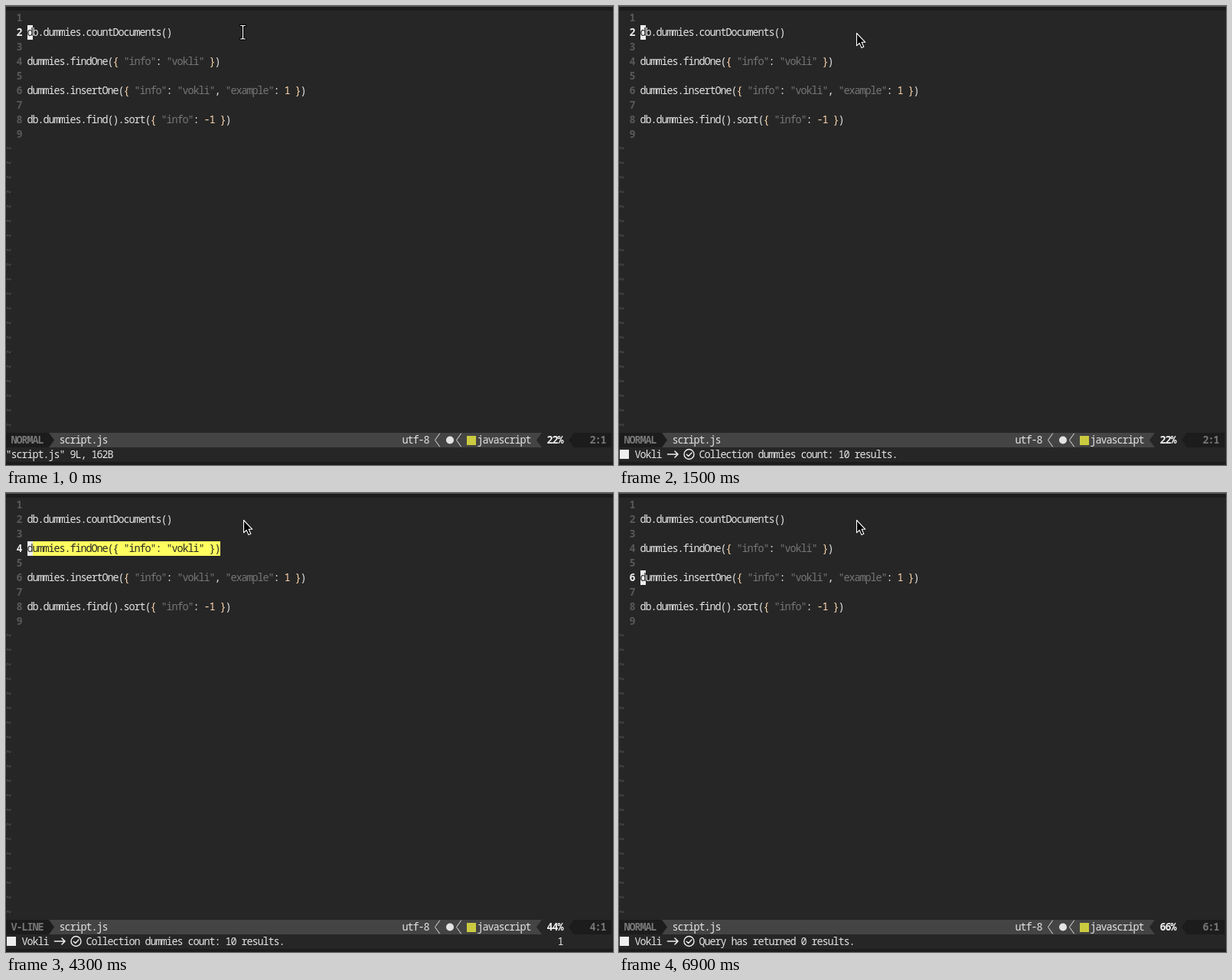
An HTML page that plays this animation: 793 by 599 pixels, repeating every 8 s.

```html
<!DOCTYPE html>
<html lang="en">
<head>
<meta charset="utf-8">
<title>Editor session</title>
<style>
  html, body { margin: 0; width: 100%; height: 100%; overflow: hidden; background: #1c1c1c; }
  svg { display: block; width: 793px; height: 599px; }
  text {
    font: extra-condensed 13.5px "Noto Sans Mono", "DejaVu Sans Mono", monospace;
    font-variant-ligatures: none;
    white-space: pre;
  }
  .bold { font-weight: bold; }
</style>
</head>
<body>
<svg id="stage" viewBox="0 0 793 599" xmlns="http://www.w3.org/2000/svg"></svg>
<script>
const LOOP = 8000, CELL = 7, ROW = 19, TOP = 6;
const STATUS_ROW = 30, MESSAGE_ROW = 31;
const C = {
  bg: '#262626', dark: '#1c1c1c', bar: '#444444', dim: '#585858', grey: '#767676',
  text: '#e4e4e4', white: '#eeeeee', peach: '#ffd7af', yellow: '#ffff5f', badge: '#cbcb41'
};
const lines = [
  '', 'db.dummies.countDocuments()', '', 'dummies.findOne({ "info": "vokli" })', '',
  'dummies.insertOne({ "info": "vokli", "example": 1 })', '',
  'db.dummies.find().sort({ "info": -1 })', ''
];
const messages = {
  running: 'Executing query [0.20 secs]',
  count: 'Collection dummies count: 10 results.',
  returned: 'Query has returned 0 results.'
};

// Each entry changes part of the editor state at its time.
const timeline = [
  [0, { line: 2, mode: 'NORMAL', selected: false, pending: false, message: 'file', pointer: 'beam' }],
  [100, { mode: 'V-LINE', selected: true, pending: true }],
  [200, { pointer: 'arrow' }],
  [1200, { message: 'running', pending: false }],
  [1400, { message: 'count', selected: false }],
  [1500, { mode: 'NORMAL' }],
  [2400, { line: 3 }],
  [2700, { line: 4 }],
  [4100, { pointer: 'beam' }],
  [4200, { mode: 'V-LINE', selected: true, pending: true }],
  [4300, { pointer: 'arrow' }],
  [5700, { message: 'running', pending: false }],
  [5900, { message: 'returned', mode: 'NORMAL', selected: false }],
  [6700, { line: 5 }],
  [6900, { line: 6 }]
];

const stage = document.getElementById('stage');
const rowTop = row => TOP + (row - 1) * ROW;
const escapeText = s => s.replace(/&/g, '&amp;').replace(/</g, '&lt;');

// Letter spacing that puts one character in each terminal cell.
const probe = document.createElement('canvas').getContext('2d');
probe.font = 'extra-condensed 13.5px "Noto Sans Mono", "DejaVu Sans Mono", monospace';
stage.innerHTML = '<text>0000000000</text>';
const advance = stage.firstChild.getComputedTextLength() / 10 || probe.measureText('0').width;
const spacing = CELL - advance;

const rect = (x, y, w, h, fill) =>
  `<rect x="${x}" y="${y}" width="${w}" height="${h}" fill="${fill}"/>`;
const shape = (d, fill) => `<path d="${d}" fill="${fill}"/>`;
const stroke = (d, color, width) =>
  `<path d="${d}" fill="none" stroke="${color}" stroke-width="${width}" stroke-linecap="round" stroke-linejoin="round"/>`;

function put(col, row, string, fill = C.text, bold = false) {
  const x = col * CELL + spacing / 2;
  return `<text x="${x}" y="${rowTop(row) + 14}" letter-spacing="${spacing}" fill="${fill}"` +
    `${bold ? ' class="bold"' : ''}>${escapeText(string)}</text>`;
}

function tokenColor(token) {
  if (token[0] === '"') return C.grey;
  return /^[{}\d-]/.test(token) ? C.peach : C.text;
}

function codeLine(string, row, flat) {
  if (flat) return put(4, row, string, C.bg);
  return [...string.matchAll(/"[^"]*"|-?\d+|[{}]|[^"{}\d-]+/g)]
    .map(m => put(4 + m.index, row, m[0], tokenColor(m[0]))).join('');
}

function buffer({ line, selected }) {
  let out = '';
  lines.forEach((string, i) => {
    const row = i + 1, current = row === line, y = rowTop(row);
    out += put(2, row, String(row), current ? C.white : C.dim, true);
    if (current && selected) out += rect(28, y, string.length * CELL, ROW, C.yellow);
    if (current) out += rect(28, y, CELL, ROW, C.white);
    out += codeLine(string, row, current && selected);
    if (current && !selected && string) {
      out += rect(28, y, CELL, ROW, C.white) + put(4, row, string[0], C.bg);
    }
  });
  for (let row = lines.length + 1; row < STATUS_ROW; row++) out += put(0, row, '~', C.dim);
  return out;
}

function statusBar({ line, mode }) {
  const y = rowTop(STATUS_ROW), mid = y + ROW / 2, end = y + ROW;
  const left = x => `M${x + 7} ${y}L${x} ${mid}L${x + 7} ${end}Z`;
  const chevron = x => stroke(`M${x + 6.5} ${y + 1}L${x + 0.5} ${mid}L${x + 6.5} ${end - 1}`, C.text, 1);
  return rect(0, y, 791, ROW, C.bar) +
    rect(0, y, 56, ROW, C.dark) + shape(`M56 ${y}L63 ${mid}L56 ${end}Z`, C.dark) +
    put(1, STATUS_ROW, mode, C.grey, true) +
    put(10, STATUS_ROW, 'script.js') +
    put(74, STATUS_ROW, 'utf-8') + chevron(560) +
    `<circle cx="580" cy="${mid}" r="5" fill="${C.text}"/>` + chevron(588) +
    rect(602, y + 4, 12, 12, C.badge) +
    put(88, STATUS_ROW, 'javascript') +
    shape(left(693), C.bg) + rect(700, y, 35, ROW, C.bg) +
    put(101, STATUS_ROW, Math.floor(line * 100 / lines.length) + '%', C.white, true) +
    rect(735, y, 7, ROW, C.bg) + shape(left(735), C.dark) + rect(742, y, 49, ROW, C.dark) +
    put(109, STATUS_ROW, line + ':1', C.grey, true);
}

function messageLine({ message, pending }) {
  let out = pending ? put(103, MESSAGE_ROW, '1') : '';
  if (message === 'file') return out + put(0, MESSAGE_ROW, '"script.js" 9L, 162B');
  out += rect(1, 579, 12, 12, C.white) + put(3, MESSAGE_ROW, 'Vokli') +
    stroke('M63.5 585H77M73 581L77 585L73 589', C.white, 1.6);
  const done = message !== 'running';
  if (done) {
    out += `<circle cx="91.5" cy="585" r="6.5" fill="none" stroke="${C.white}" stroke-width="1.4"/>` +
      stroke('M88.3 585.2L90.7 587.6L95 583', C.white, 1.4);
  }
  return out + put(done ? 15 : 12, MESSAGE_ROW, messages[message]);
}

function pointerShape(kind) {
  if (kind === 'beam') {
    const d = 'M306.5 25.5H308.5L309.5 26.5L310.5 25.5H312.5M309.5 26.5V42M306.5 43H308.5L309.5 42L310.5 43H312.5';
    return stroke(d, '#000', 3.4) + stroke(d, '#fff', 1.2);
  }
  return '<path d="M310.5 35.5V51.8L314.2 48.4L316.9 54.6L319.8 53.3L317.1 47.3H321.8Z" ' +
    'fill="#000" stroke="#fff" stroke-width="1.1" stroke-linejoin="round"/>';
}

function stateAt(time) {
  return Object.assign({}, ...timeline.filter(([start]) => start <= time).map(step => step[1]));
}

let shown = '';
function render(time) {
  const state = stateAt(time), key = JSON.stringify(state);
  if (key === shown) return;
  shown = key;
  stage.innerHTML = rect(0, 0, 793, 599, C.dark) + rect(0, 0, 793, 1, '#5a5a5a') +
    rect(0, TOP, 793, ROW * MESSAGE_ROW, C.bg) +
    buffer(state) + statusBar(state) + messageLine(state) + pointerShape(state.pointer);
}

const began = performance.now();
function tick() {
  render((performance.now() - began) % LOOP);
  requestAnimationFrame(tick);
}
tick();
</script>
</body>
</html>
```
